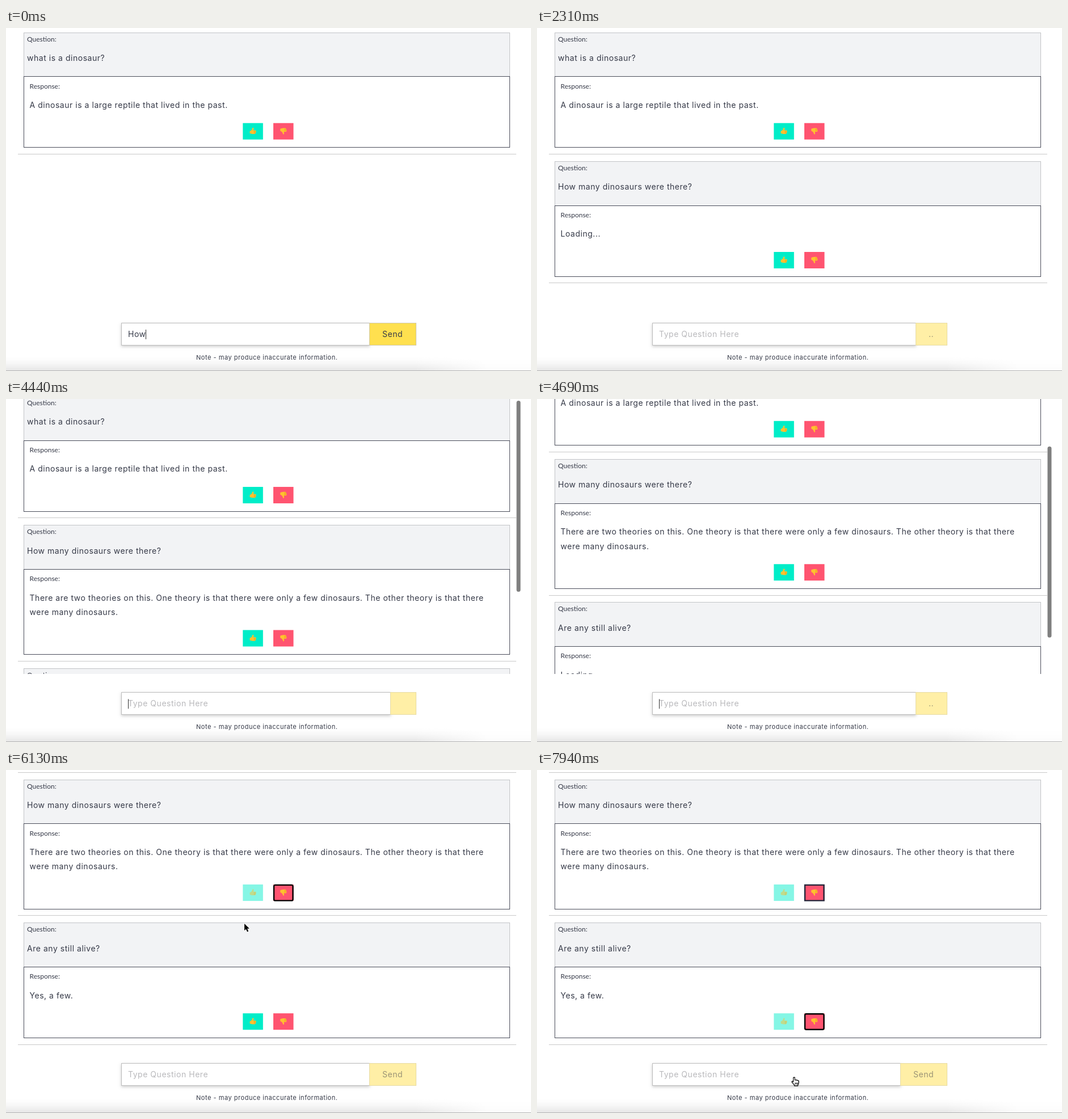
An HTML page with a canvas for the animation above (8000 ms loop, 925 by 605 pixels).

```html
<!DOCTYPE html>
<html lang="en">
<head>
<meta charset="utf-8">
<title>Chat demo</title>
<style>
  html, body { margin: 0; width: 100%; height: 100%; overflow: hidden; background: #fff; }
  canvas { display: block; }
</style>
</head>
<body>
<canvas id="stage" width="925" height="605"></canvas>
<script>
const ctx = document.getElementById('stage').getContext('2d');
const LOOP = 8000;
const INK = '#363a48';
const FONT = 'Inter, "Open Sans", sans-serif';

// Timeline (ms)
const SENT_1 = 1750, REPLY_1 = 2400, TYPE_2 = 3105, SENT_2 = 4250, REPLY_2 = 4960;
const SCROLL_START = 4365, SCROLL_END = 4950, SCROLL_MAX = 215.6;
const CLICK_1 = 5670, CLICK_2 = 7150;

const QUESTION_1 = 'How many dinosaurs were there?';
const QUESTION_2 = 'Are any still alive?';
const REPLY_TEXT_1 = [
  'There are two theories on this. One theory is that there were only a few dinosaurs. The other theory is that there',
  'were many dinosaurs.'
];

// Pointer stops: time, x, y
const POINTER = [
  [5100, 600, 371], [5610, 487, 222], [5890, 487, 222], [6120, 420, 271],
  [6690, 420, 271], [7060, 486, 442], [7230, 486, 442], [7620, 453, 542]
];

const THUMB = new Path2D('M-5.5 .2C-3.5-.5-1.5-2-.7-5.2C-.4-6.4 1.3-6 1.3-4.4L1-1.3H4.6Q6-1 5.5.3Q6 1.2 5.3 2Q5.6 3 4.7 3.6Q4.8 5 3.4 5.2H-.5Q-3 5-5.5 4Z');
const KNUCKLES = new Path2D('M1.6 .5H5M1.6 2.1H5M1.6 3.7H4.4');
const ARROW = new Path2D('M0 0V12.2L2.8 9.6L5 14.4L7.2 13.4L5.1 8.8H8.9Z');
const HAND = new Path2D('M-1.4 1Q0-.8 1.4 1V5Q2.6 4 3.8 5.2Q5 4.4 6 5.8Q7.6 5.2 8 7V10Q7.6 12 6.6 13V14.8H.4V13.4L-3.6 8.8Q-4.4 7-2.8 7L-1.4 8.2Z');

const clamp = v => Math.min(1, Math.max(0, v));
const progress = (t, start, length) => clamp((t - start) / length);
const smooth = u => u * u * (3 - 2 * u);

function useFont(size, family = FONT) {
  ctx.font = `${size}px ${family}`;
  ctx.letterSpacing = family === FONT ? '0.53px' : '0px';
}

function text(str, x, y, size = 14, color = INK, family = FONT) {
  useFont(size, family);
  ctx.fillStyle = color;
  ctx.fillText(str, x, y);
}

function box(x, y, right, bottom, fill, border) {
  x = Math.round(x); y = Math.round(y);
  right = Math.round(right); bottom = Math.round(bottom);
  ctx.fillStyle = fill;
  ctx.fillRect(x, y, right - x, bottom - y);
  ctx.strokeStyle = border;
  ctx.lineWidth = 1;
  ctx.strokeRect(x + .5, y + .5, right - x - 1, bottom - y - 1);
}

function thumbButton(x, y, width, color, down) {
  ctx.fillStyle = color;
  ctx.fillRect(x, y, width, 29);
  ctx.save();
  ctx.translate(x + width / 2, y + 14);
  if (down) ctx.scale(1, -1);
  ctx.fillStyle = '#ffc12f';
  ctx.fill(THUMB);
  ctx.strokeStyle = '#df9418';
  ctx.lineWidth = .6;
  ctx.stroke(KNUCKLES);
  ctx.restore();
}

function ring(x, y, focused) {
  ctx.strokeStyle = focused ? '#000' : '#22263a';
  ctx.lineWidth = 2.4;
  ctx.beginPath();
  ctx.roundRect(x + 1, y + 1, 33.5, 27.5, focused ? 2.5 : 0);
  ctx.stroke();
}

// Draws one question with its response and returns the top of the next one.
function exchange(top, question, lines, t, clicked = Infinity, blurred = Infinity) {
  const extra = (lines.length - 1) * 25.2;
  box(31.4, top - .4, 888, top + 79, '#f2f3f5', '#c2c4c7');
  box(31.4, top + 77.4, 888, top + 203.4 + extra, '#fff', '#4a4d5a');
  text('Question:', 37, top + 15.5, 12, INK, 'Lato, sans-serif');
  text(question, 37, top + 50);
  text('Response:', 41.5, top + 98.5, 12, INK, 'Lato, sans-serif');
  lines.forEach((line, i) => text(line, 41.5, top + 133 + i * 25.2));

  const buttonY = top + 159.7 + extra;
  ctx.globalAlpha = 1 - .52 * progress(t, clicked, 200);
  thumbButton(417.3, buttonY, 35.5, '#00edc8', false);
  ctx.globalAlpha = 1;
  thumbButton(471, buttonY, 35.5, '#ff5470', true);
  if (t >= clicked) ring(471, buttonY, t < blurred);

  ctx.fillStyle = '#c9c9c9';
  ctx.fillRect(21, Math.round(top + 214 + extra), 878, 1);
  return top + 227.3 + extra;
}

function drawChat(t, shift) {
  const scroll = SCROLL_MAX * smooth(progress(t, SCROLL_START, SCROLL_END - SCROLL_START));
  ctx.save();
  ctx.beginPath();
  ctx.rect(0, 0, 925, 487.7 + shift);
  ctx.clip();
  let top = exchange(8 + shift - scroll, 'what is a dinosaur?',
    ['A dinosaur is a large reptile that lived in the past.'], t);
  if (t >= SENT_1)
    top = exchange(top, QUESTION_1, t < REPLY_1 ? ['Loading...'] : REPLY_TEXT_1, t, CLICK_1, CLICK_2);
  if (t >= SENT_2)
    exchange(top, QUESTION_2, [t < REPLY_2 ? 'Loading...' : 'Yes, a few.'], t, CLICK_2);
  ctx.restore();

  if (t >= SCROLL_START) {
    ctx.fillStyle = `rgba(0,0,0,${.5 * (1 - progress(t, 5050, 250))})`;
    ctx.beginPath();
    ctx.roundRect(899.5, Math.max(1, scroll * .695 - 4), 7, 337, 3.5);
    ctx.fill();
  }
}

function typedText(t) {
  if (t < SENT_1) return QUESTION_1.slice(0, 3 + Math.floor(t / 62));
  if (t < TYPE_2 || t >= SENT_2) return '';
  const count = t < 3440 ? 1 + Math.floor((t - TYPE_2) / 115) : 4 + Math.floor((t - 3440) / 47);
  return QUESTION_2.slice(0, count);
}

function buttonLabel(t) {
  const sent = t >= SENT_2 ? SENT_2 : SENT_1;
  const reply = t >= SENT_2 ? REPLY_2 : REPLY_1;
  if (t < sent || t >= reply) return 'Send';
  return '.'.repeat(Math.floor((t - sent) / 200) % 4);
}

function buttonOpacity(t) {
  if (t < TYPE_2) return 1 - .5 * progress(t, SENT_1, 150);
  if (t < SENT_2) return .5 + .5 * progress(t, TYPE_2, 150);
  return 1 - .5 * progress(t, SENT_2, 150);
}

function drawForm(t, shift) {
  const top = 520 + shift, bottom = 560 + shift, baseline = 545 + shift;
  const label = buttonLabel(t);
  useFont(14);
  const left = Math.round(722.5 - 46 - ctx.measureText(label).width);

  ctx.save();
  ctx.shadowColor = 'rgba(0,0,0,.2)';
  ctx.shadowBlur = 5;
  ctx.shadowOffsetY = 2;
  ctx.fillStyle = '#fff';
  ctx.fillRect(203, Math.round(top), left - 202, 40);
  ctx.restore();
  box(203, top, left + 1, bottom, '#fff', '#bdbdbd');

  ctx.fillStyle = '#fff';
  ctx.fillRect(left, Math.round(top), 723 - left, 40);
  ctx.globalAlpha = buttonOpacity(t);
  box(left, top, 723, bottom, '#ffe04f', '#d0c8a4');
  text(label, left + 23, baseline);
  ctx.globalAlpha = 1;

  const typed = typedText(t);
  text(typed || 'Type Question Here', 215, baseline, 14, typed ? INK : '#b9b9bc');
  const idleSince = t < SENT_1 || (t >= TYPE_2 && t < SENT_2) ? t : t < SENT_2 ? SENT_1 : SENT_2;
  if (t < CLICK_1 && (t - idleSince) % 1000 < 500) {
    ctx.fillStyle = '#333';
    ctx.fillRect(Math.round(214.5 + (typed ? ctx.measureText(typed).width : 0)), baseline - 13, 1, 17);
  }
  text('Note - may produce inaccurate information.', 335, 585 + shift, 11);
}

function drawWindowEdge() {
  for (let y = 578; y < 604; y++) {
    const depth = ((y - 578) / 26) ** 1.6 * .1;
    const fade = ctx.createLinearGradient(0, 0, 925, 0);
    fade.addColorStop(0, `rgba(0,0,0,${depth})`);
    fade.addColorStop(.78, `rgba(0,0,0,${depth})`);
    fade.addColorStop(.92, `rgba(0,0,0,${depth * .15})`);
    ctx.fillStyle = fade;
    ctx.fillRect(0, y, 925, 1);
  }
  ctx.fillStyle = '#b4b4b4';
  ctx.fillRect(0, 604, 925, 1);
}

function drawPointer(t) {
  if (t < POINTER[0][0]) return;
  let [, x, y] = POINTER[POINTER.length - 1];
  const next = POINTER.findIndex(stop => stop[0] > t);
  if (next > 0) {
    const [t0, x0, y0] = POINTER[next - 1], [t1, x1, y1] = POINTER[next];
    const u = smooth((t - t0) / (t1 - t0));
    x = x0 + (x1 - x0) * u;
    y = y0 + (y1 - y0) * u;
  }
  const overButton = x > 471 && x < 507 && ((y > 202 && y < 231) || (y > 429 && y < 458));
  const hand = overButton || t > CLICK_2;
  const shape = hand ? HAND : ARROW;
  ctx.save();
  ctx.translate(x, y);
  ctx.lineJoin = 'round';
  ctx.strokeStyle = hand ? '#111' : '#fff';
  ctx.lineWidth = hand ? 1.2 : 2;
  ctx.fillStyle = hand ? '#fff' : '#000';
  ctx.stroke(shape);
  ctx.fill(shape);
  if (hand) {
    ctx.stroke(shape);
    ctx.stroke(new Path2D('M2 9.5V12.5M4 9.5V12.5M6 9.5V12.5'));
  }
  ctx.restore();
}

function frame() {
  const t = performance.now() % LOOP;
  const shift = t < REPLY_1 ? 0 : -2.7;
  ctx.fillStyle = '#fff';
  ctx.fillRect(0, 0, 925, 605);
  drawWindowEdge();
  drawChat(t, shift);
  drawForm(t, shift);
  drawPointer(t);
  requestAnimationFrame(frame);
}
frame();
</script>
</body>
</html>
```
